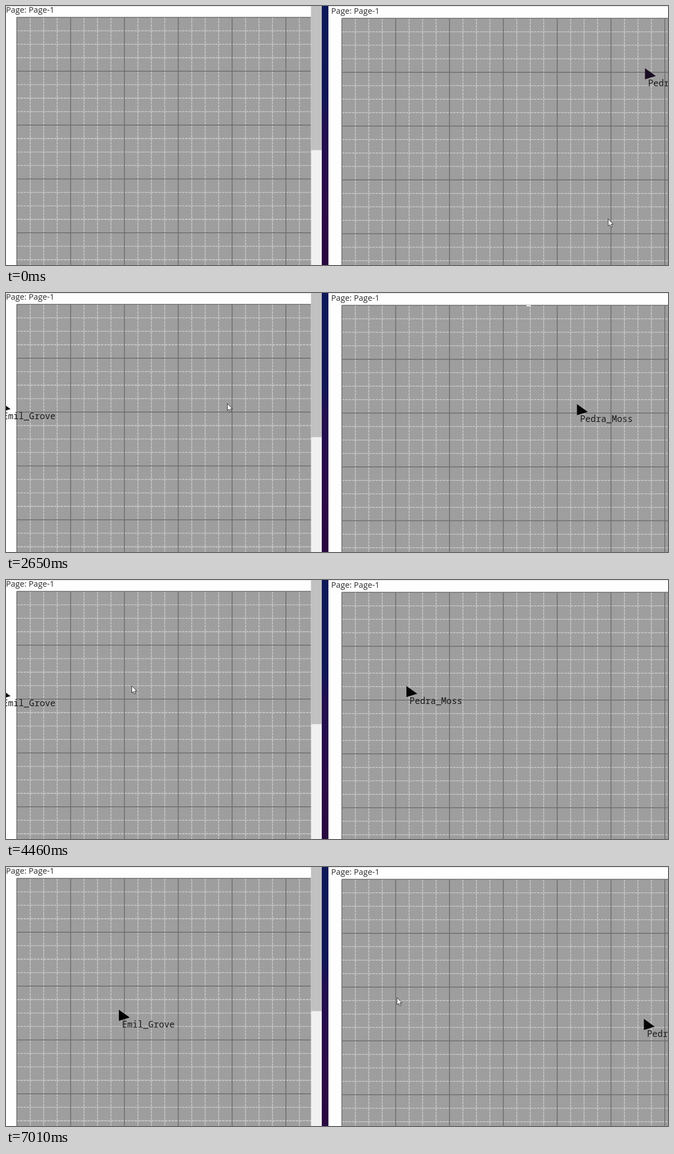
Write an HTML page with a canvas that moves like this. It is 1197x468 px and loops after 7.1 s.

```html
<!DOCTYPE html>
<html lang="en">
<head>
<meta charset="utf-8">
<title>Shared pointers</title>
<style>
html, body { margin: 0; width: 100%; height: 100%; overflow: hidden; background: #fff; }
canvas { display: block; }
</style>
</head>
<body>
<canvas id="stage" width="1197" height="468"></canvas>
<script>
const W = 1197, H = 468, LOOP = 7100;
const CELL = 97.33 / 4, PANEL_END = 552;
const SHIFT = { x: 588, y: 2 };   // from the left page to the right page
const LAG = 150;                  // delay of the mirrored pointer
const ENTER = 2050, EXIT = 5180;  // time the cursor spends in the left window
const ctx = document.getElementById('stage').getContext('2d');

// Turning points of the mouse: [time, x, y]
const mouse = [
  [-LAG, 1105, 500], [0, 1089, 385], [560, 1038, 241], [1110, 1004, 232],
  [1260, 977, 226], [1470, 938, 217], [1930, 606, 199], [2080, 570, 198],
  [3090, 270, 201], [3240, 235, 202], [3730, 163, 198], [4310, 136, 190],
  [4460, 227, 191], [EXIT, 566, 273], [5320, 670, 310], [5470, 759, 333],
  [6200, 1079, 362], [6730, 868, 282], [7010, 707, 236], [LOOP, 707, 236]
];

function mouseAt(t) {
  const i = mouse.findIndex(p => p[0] > t);
  const [t0, x0, y0] = mouse[i - 1], [t1, x1, y1] = mouse[i];
  const k = (t - t0) / (t1 - t0);
  return { x: x0 + (x1 - x0) * k, y: y0 + (y1 - y0) * k };
}

// The left page mirrors the mouse while it is over the right window.
function leftPointer(t) {
  const seen = t - LAG;
  const p = mouseAt(seen > ENTER && seen < EXIT ? ENTER : seen);
  return { x: p.x - SHIFT.x, y: p.y - SHIFT.y };
}

// The right page mirrors the mouse while it is over the left window.
function rightPointer(t) {
  const seen = t - LAG;
  if (seen < ENTER + 80) return { x: 1156, y: 113 };
  const p = mouseAt(Math.min(seen, EXIT));
  return { x: p.x + SHIFT.x, y: p.y + SHIFT.y };
}

function rect(g, color, x, y, w, h) {
  g.fillStyle = color;
  g.fillRect(x, y, w, h);
}

function line(g, x0, y0, x1, y1) {
  g.beginPath();
  g.moveTo(x0, y0);
  g.lineTo(x1, y1);
  g.stroke();
}

function gridLines(g, x, y, right, major) {
  g.strokeStyle = major ? '#6c6c6c' : '#d2d2d2';
  g.lineWidth = major ? 1.5 : 1.3;
  g.setLineDash(major ? [] : [CELL / 4 - 1.3, 1.3]);
  for (let i = 0; i < 26; i++) {
    if ((i % 4 === 0) !== major) continue;
    const px = x + i * CELL, py = y + i * CELL;
    if (px < right) line(g, px, y, px, H);
    if (py < H) line(g, x, py, right, py);
  }
}

function page(g, x, y, right, textX) {
  rect(g, '#9e9e9e', x, y, right - x, H - y);
  gridLines(g, x, y, right, false);
  gridLines(g, x, y, right, true);
  g.fillStyle = '#2a2a2a';
  g.font = '14.7px "Open Sans", "Noto Sans", sans-serif';
  g.fillText('Page: Page-1', textX, Math.round(y - 8.4));
}

function makeBackdrop() {
  const c = document.createElement('canvas');
  c.width = W;
  c.height = H;
  const g = c.getContext('2d');
  rect(g, '#fefefe', 0, 0, W, H);
  rect(g, '#dcdcdc', 0, 0, W, 1);
  page(g, 19.5, 20.5, PANEL_END, 0);
  page(g, 607.3, 22.3, W, SHIFT.x);
  rect(g, '#f1f1f1', PANEL_END - 0.5, 0, 20, H);
  rect(g, '#c1c1c1', PANEL_END - 0.5, 0, 20, 260.5);
  const strip = g.createLinearGradient(0, 0, 0, H);
  strip.addColorStop(0, '#0d1959');
  strip.addColorStop(0.36, '#101657');
  strip.addColorStop(0.46, '#220f50');
  strip.addColorStop(0.75, '#2b0b4a');
  strip.addColorStop(1, '#2a0840');
  rect(g, strip, 571, 0, 12, H);
  return c;
}

function pointer({ x, y }, name, color) {
  ctx.fillStyle = color;
  ctx.beginPath();
  ctx.moveTo(x - 0.6, y - 0.6);
  ctx.lineTo(x + 19, y + 13.5);
  ctx.lineTo(x - 0.6, y + 19.6);
  ctx.fill();
  ctx.fillStyle = '#1b1b1b';
  ctx.font = '15.9px "Noto Sans Mono", "DejaVu Sans Mono", monospace';
  ctx.fillText(name, x + 5, y + 32);
}

const arrow = new Path2D('M0 0V13L3 10.3 5.2 15 7.2 14.1 5.2 9.6H9Z');

function cursor({ x, y }) {
  ctx.save();
  ctx.translate(x, y);
  ctx.fillStyle = '#fff';
  ctx.strokeStyle = '#333';
  ctx.fill(arrow);
  ctx.stroke(arrow);
  ctx.restore();
}

const backdrop = makeBackdrop();

function draw(t) {
  ctx.drawImage(backdrop, 0, 0);
  if (t > 1900 && t < 3100) rect(ctx, '#f4f4f4', 941, 22, 8, 2);
  ctx.save();
  ctx.beginPath();
  ctx.rect(0, 0, PANEL_END, H);
  ctx.clip();
  pointer(leftPointer(t), 'Emil_Grove', '#000');
  ctx.restore();
  pointer(rightPointer(t), 'Pedra_Moss', t < ENTER + LAG ? '#1a0d24' : '#050505');
  cursor(mouseAt(t));
}

const start = performance.now();
function frame() {
  draw((performance.now() - start) % LOOP);
  requestAnimationFrame(frame);
}
frame();
</script>
</body>
</html>
```
